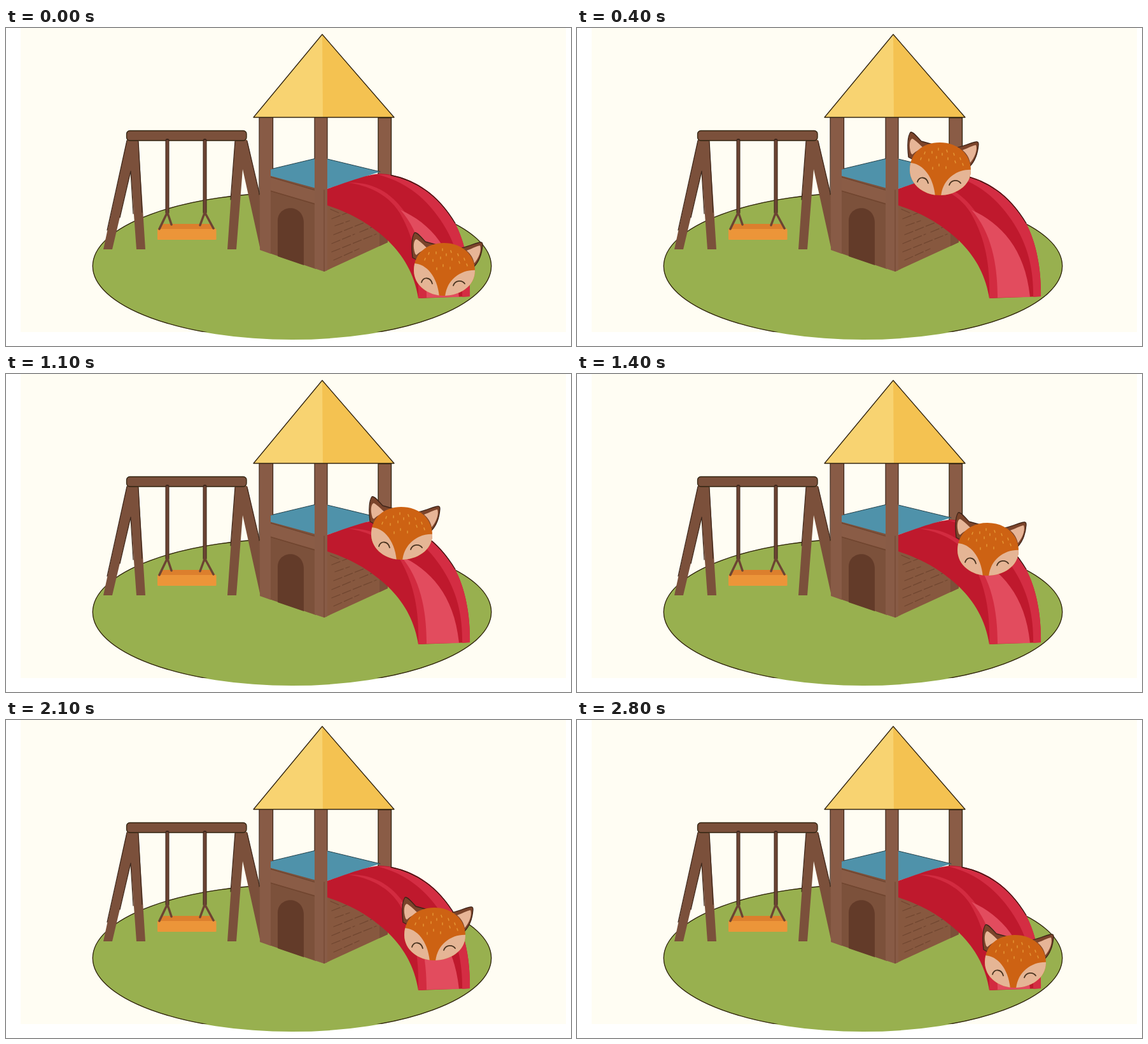
These frames come from a looping animation (888x500 px, 3100 ms). An HTML page:

```html
<!DOCTYPE html>
<html lang="en">
<head>
<meta charset="utf-8">
<title>Fox on a slide</title>
<style>
html, body { margin: 0; width: 100%; height: 100%; overflow: hidden; background: #fff; }
svg { display: block; width: 888px; height: 500px; }
.edge { stroke: #30230f; stroke-width: 1.3; stroke-linejoin: round; }
.line { fill: none; stroke-linecap: round; }
</style>
</head>
<body>
<svg viewBox="0 0 888 500">
  <defs>
    <clipPath id="sky"><rect x="23" width="857" height="478"/></clipPath>
    <clipPath id="face"><path d="M641 381C641 354 662 338 688 338C716 338 737 356 737 382C737 406 713 421 688 421C664 421 641 405 641 381Z"/></clipPath>
  </defs>
  <rect x="23" width="857" height="478" fill="#fffdf3"/>

  <ellipse cx="449.5" cy="374.3" rx="313.7" ry="115.8" fill="#98b04f"/>
  <ellipse cx="449.5" cy="374.3" rx="313.2" ry="115.3" fill="none" class="edge" clip-path="url(#sky)"/>

  <!-- swing -->
  <g fill="#7b503b">
    <path d="M190 176H208L219 348H205L196 225L167 348H153Z"/>
    <path d="M360 176H379L400 268V349L372 222L362 348H348L360 176Z"/>
    <path d="M190 177L159 318M379 178L398 259M208 178L214 290M360 178L353 270M196 225L179 298M196 225L200 292" class="line" stroke="#3b2519" stroke-width="1.200"/>
    <rect class="edge" x="189.500" y="161.500" width="188.500" height="15.500" rx="5"/>
  </g>
  <path d="M247 308H322L330 317H238Z" fill="#dc7f2d"/>
  <rect x="238" y="316" width="92.500" height="17" rx="1" fill="#ec9539"/>
  <g class="line" stroke="#6c4433">
    <path d="M253.500 177V290M312.500 177V290" stroke="#3b2519" stroke-width="6"/>
    <path d="M253.500 178V293M312.500 178V293" stroke-width="4"/>
    <path d="M253 291L241 316M254 291L260 309M312 291L305 310M313 291L326 315" stroke-width="3.500"/>
  </g>

  <!-- tower -->
  <path d="M585 141H605.500V240H585Z" fill="#8a5c46" class="edge"/>
  <path d="M500 255L600 232V337L500 383Z" fill="#87583f"/>
  <path d="M587 290H600V337L587 343Z" fill="#7c4f39"/>
  <path d="M416 222L487 205H501L588 226L505 253H485L416 233Z" fill="#4f92aa"/>
  <path d="M416 222L487 205M501 205L588 226" class="line" stroke="#24414b"/>
  <path d="M414 232L487 252V379L414 354Z" fill="#7c513b"/>
  <path d="M414 233L487 254V276L414 255Z" fill="#8a5c46"/>
  <path d="M415 234L486 255M415 256L486 277" class="line" stroke="#70452f" stroke-width="1.500"/>
  <path d="M427 359V303C427 277 468 275 468 307V373Z" fill="#633b29"/>
  <path d="M398 141H419V222H416V355L399 349Z" fill="#885b46"/>
  <path d="M485 141H505V381L500 383L485 378Z" fill="#885b46"/>
  <path d="M398 141V262M419.500 141V221M485 141V205M505 141V205" class="line" stroke="#3b2519" stroke-width="1.200"/>
  <path d="M500 255V382" class="line" stroke="#774a36" stroke-width="1.500"/>
  <path d="M510 285L524 291M512 300L556 283M517 311L540 303M515 325L578 300M512 339L548 324M556 321L585 309M512 352L582 324M515 365L555 347" class="line" stroke="#704630" stroke-width="1.300" stroke-dasharray="14 4"/>
  <path d="M497 10L610 140.500H389Z" fill="#f8d371"/>
  <path d="M497 10L610 140.500H498Z" fill="#f4c251"/>
  <path d="M497 10L610 140.500H389Z" fill="none" class="edge"/>

  <!-- slide -->
  <path d="M505 253C540 241 565 231 588 229C637 231 677 260 703 302C720 331 730 374 729 422L648 425C642 386 624 358 602 336C575 310 545 292 505 279Z" fill="#bf192d"/>
  <path d="M583 230C637 230 678 260 703 302C720 331 730 374 729 422L717 423C718 374 706 336 683 302C657 264 626 241 583 230Z" fill="#d42d43"/>
  <path d="M538 243C582 242 607 263 625 287C651 321 661 365 662 424L648 425C649 384 646 338 619 291C602 264 575 249 538 243Z" fill="#d22b40"/>
  <path d="M620 286C667 307 705 349 712 423L661 424C661 373 652 322 620 286Z" fill="#e24c5e"/>
  <path d="M605 231.500C647 240 680 264 706 307" class="line" stroke="#38160f" stroke-width="1.300"/>

  <g id="fox">
    <g fill="#7b442b" stroke="#3e2418" stroke-width="1.300" stroke-linejoin="round">
      <path d="M639 361C637 343 638 328 642 322C645 320 652 328 659 336L677 341L650 367Z"/>
      <path d="M710 346C720 347 731 340 745 337Q749 336 749 341C748 354 745 366 735 376Z"/>
    </g>
    <path d="M643 355C639 343 641 333 645 332C651 335 657 342 663 347C655 349 649 353 645 357Z" fill="#e7b597"/>
    <path d="M724 350C732 347 739 343 745 342C748 349 743 362 736 370C734 361 730 355 724 350Z" fill="#e7b597"/>
    <g clip-path="url(#face)">
      <rect x="638" y="336" width="102" height="87" fill="#cd6213"/>
      <path d="M638 370C660 369 678 390 681 423H638Z" fill="#e5b595"/>
      <path d="M740 381C715 379 692 396 690 423H740Z" fill="#e5b595"/>
    </g>
    <path d="M659 362l-1 3M665 353l-1 3M671 364l0 3M676 352l0 3M683 360l0 3M686 347l0 3M692 355l0 3M699 350l1 3M701 362l0 3M710 355l1 3M712 367l1 3M720 362l1 3M724 371l1 3M687 372l0 3M677 377l0 3M698 376l0 3" class="line" stroke="#e59a38" stroke-width="1.400"/>
    <path d="M653 400C656 391 667 391 670 402M703 405C706 396 717 396 721 402" class="line" stroke="#4a3420" stroke-width="1.800"/>
  </g>
</svg>
<script>
const LOOP = 3100;
// start time, offset from the foot of the slide
const poses = [
  [0, 0, 0], [100, -138, -164], [200, -132, -162], [300, -125, -160],
  [400, -118, -158], [700, -95, -147], [1100, -67, -129], [1400, -43, -104],
  [1800, -23, -75], [2100, -15, -43], [2500, -6, -20], [2800, 0, 0]
];
const fox = document.getElementById('fox');

function draw(now) {
  const t = now % LOOP;
  const [, x, y] = poses.findLast(p => p[0] <= t);
  fox.setAttribute('transform', `translate(${x} ${y})`);
  requestAnimationFrame(draw);
}
draw(performance.now());
</script>
</body>
</html>
```
